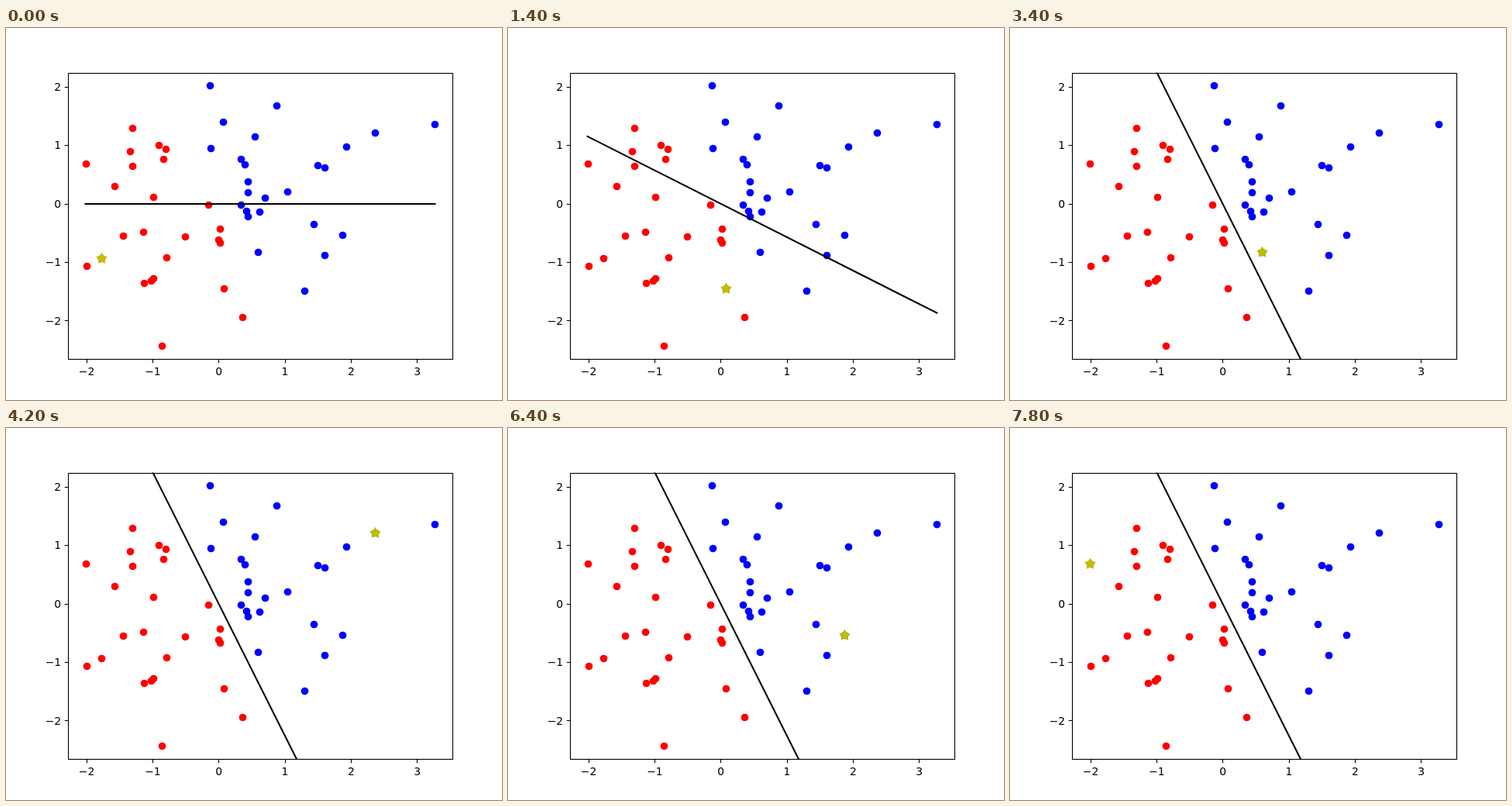
These frames come from a looping animation (640 by 480 pixels, 8 s). An HTML page:

```html
<!DOCTYPE html>
<html lang="en">
<head>
<meta charset="utf-8">
<title>Perceptron</title>
<style>
  html, body { margin: 0; width: 100%; height: 100%; overflow: hidden; background: #fff; }
  svg { display: block; width: 640px; height: 480px; }
  text { font: 13.89px "DejaVu Sans", sans-serif; }
  .axis { fill: none; stroke: #000; stroke-width: 1.11; }
  .current { fill: #bfbf00; stroke: #bfbf00; stroke-width: 1.39; stroke-linejoin: bevel; }
</style>
</head>
<body>
<svg viewBox="0 0 640 480">
  <clipPath id="plot"><rect x="80" y="57.6" width="496" height="369.6"/></clipPath>
  <path id="star" class="current"/>
  <g id="dots"></g>
  <path id="boundary" clip-path="url(#plot)" stroke="#000" stroke-width="2.08" stroke-linecap="square"/>
  <circle id="core" class="current" r="4.17"/>
  <rect class="axis" x="80.5" y="58.5" width="496" height="369"/>
  <g id="ticks"></g>
</svg>
<script>
const $ = id => document.getElementById(id);
const ORIGIN = { x: 274.4, y: 226.7 }, UNIT = { x: 85.3, y: 75.35 };
const LEFT = 102.5, RIGHT = 553.5;
const LOOP = 8000, STEP = 200, STEPS = LOOP / STEP - 1;
const snap = v => Math.round(v) + 0.5;

// The data set, in the order in which training visits it.
const samples = [
  [123,297], [439,153], [177,263], [197,151.4], [334,219], [201,410], [281,336],
  [402,177], [231,269], [140,204], [363,211], [411,180], [207,296], [312,198],
  [349,100], [178,329], [324.8,288.6], [163,129], [276,277], [321,140], [476,135],
  [104,307], [261,228], [312,212], [553,124], [327,237], [305,373], [190,218],
  [312,243], [206,156], [303,169], [434,267], [276,259], [264,155], [160,159],
  [411,293], [308,176], [274,273], [103,175], [151,268], [163,178], [187,326],
  [190,323], [203,169], [263,74], [280,121], [303,228], [310,236], [397,253], [385,339]
].map(([px, py]) => {
  const x = (px - ORIGIN.x) / UNIT.x, y = (ORIGIN.y - py) / UNIT.y;
  return { x, y, cx: snap(px), cy: snap(py), label: Math.sign(2 * x + y) };
});

// Perceptron rule: a misclassified sample is added to the weights with its sign.
const weights = { x: 0, y: 1 };
const slopes = samples.slice(0, STEPS).map(({ x, y, label }) => {
  if (label * (weights.x * x + weights.y * y) < 0) {
    weights.x += label * x;
    weights.y += label * y;
  }
  return weights.x / weights.y * UNIT.y / UNIT.x;
});

$('dots').innerHTML = samples.map(({ cx, cy, label }) =>
  `<circle cx="${cx}" cy="${cy}" r="4.86" fill="${label > 0 ? '#00f' : '#f00'}"/>`).join('');

let ticks = '';
for (let n = -2; n <= 3; n++) {
  const x = ORIGIN.x + n * UNIT.x, y = ORIGIN.y - n * UNIT.y;
  const name = String(n).replace('-', '−');
  ticks += `<path class="axis" d="M${snap(x)} 427.5v4.86"/>
    <text x="${x + 0.3}" y="448" text-anchor="middle">${name}</text>`;
  if (n < 3) ticks += `<path class="axis" d="M80.5 ${snap(y)}h-4.86"/>
    <text x="71.2" y="${Math.round(y + 5.1)}" text-anchor="end">${name}</text>`;
}
$('ticks').innerHTML = ticks;

$('star').setAttribute('d', 'M' + Array.from({ length: 10 }, (_, i) => {
  const r = i % 2 ? 2.65 : 6.94, a = i * Math.PI / 5;
  return `${r * Math.sin(a)},${-r * Math.cos(a)}`;
}).join('L') + 'Z');

function draw(now) {
  const step = Math.max(0, Math.floor(now % LOOP / STEP) - 1);
  const slope = slopes[step], { cx, cy } = samples[step];
  const middle = slope ? ORIGIN.y : Math.round(ORIGIN.y);
  const end = x => `${x} ${middle + slope * (x - ORIGIN.x)}`;
  $('boundary').setAttribute('d', `M${end(LEFT)}L${end(RIGHT)}`);
  for (const id of ['star', 'core']) $(id).setAttribute('transform', `translate(${cx} ${cy})`);
  requestAnimationFrame(draw);
}
draw(performance.now());
</script>
</body>
</html>
```
